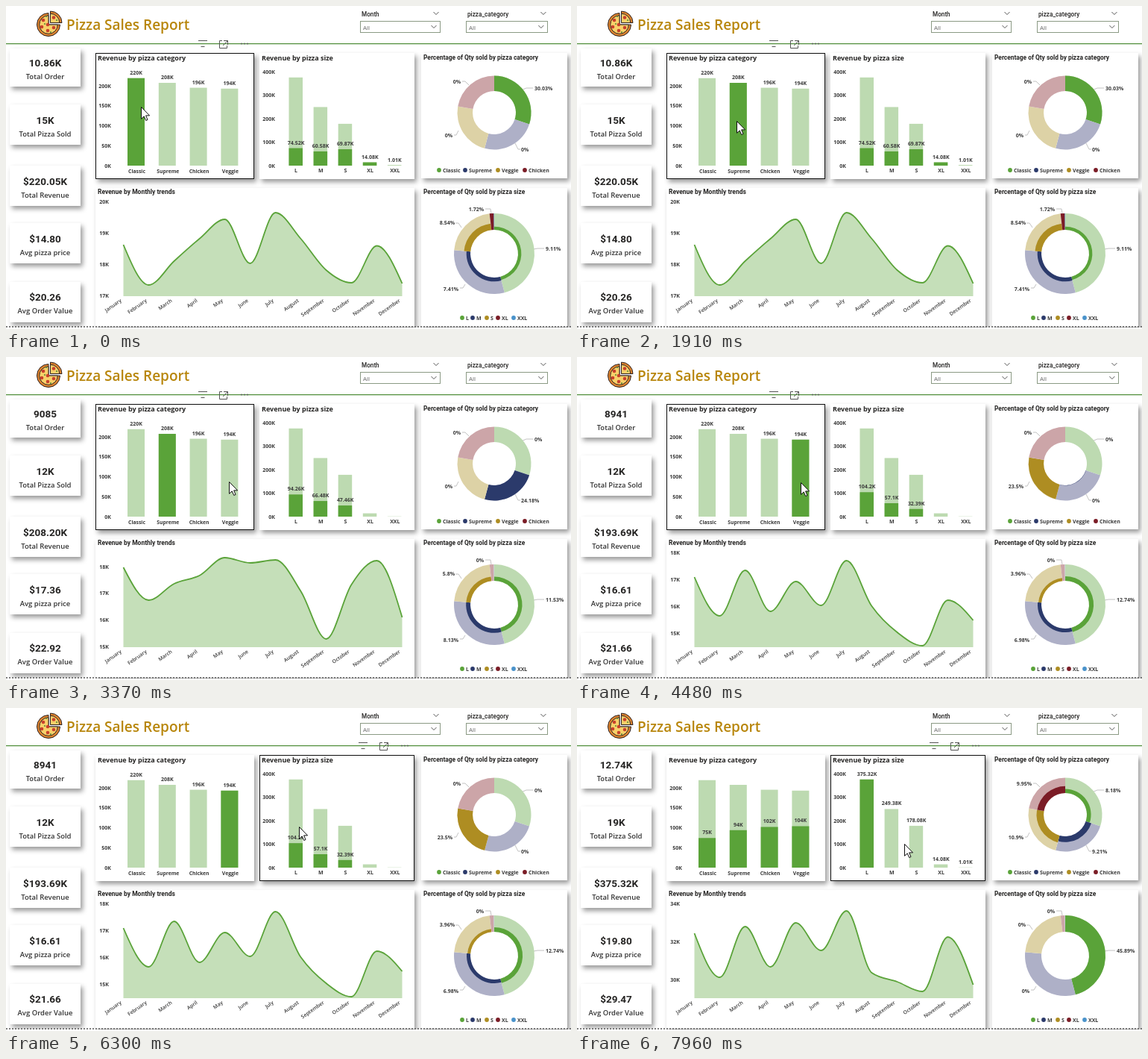
Write an HTML page that moves like this. It is 758 by 433 pixels and loops after 8 s.

```html
<!DOCTYPE html>
<html lang="en">
<head>
<meta charset="utf-8">
<title>Pizza Sales Report</title>
<style>
  html, body { margin: 0; width: 100%; height: 100%; overflow: hidden; background: #fff; }
  svg { display: block; font-family: "Open Sans", "Noto Sans", sans-serif; }
  .din { font-family: Roboto, sans-serif; }
  .card { fill: #fff; filter: drop-shadow(3px 4px 3px #0006); }
  .lead { fill: none; stroke: #b3b3b3; stroke-width: .8; }
  .icon { fill: none; stroke: #555; }
</style>
</head>
<body>
<svg width="758" height="433" viewBox="0 0 758 433">
  <g id="fixed"></g>
  <g id="live"></g>
</svg>
<script>
const LOOP = 8000;
const GREEN = '#5aa339', PALE = '#bddab1';
const COLORS = [GREEN, '#2b3a6b', '#ae8d22', '#7b1c26', '#4a93cb'];
const TINTS = [PALE, '#aeb0c7', '#ddd2a6', '#cca5a8', '#b7d4ea'];
const CATEGORIES = ['Classic', 'Supreme', 'Chicken', 'Veggie'];
const SIZES = ['L', 'M', 'S', 'XL', 'XXL'];
const MONTHS = ['January', 'February', 'March', 'April', 'May', 'June', 'July',
  'August', 'September', 'October', 'November', 'December'];
const CAT_TOTAL = [220.05, 208.2, 195.92, 193.69];
const SIZE_TOTAL = [375.32, 249.38, 178.08, 14.08, 1.01];
const QTY_SHARE = [30.03, 24.18, 23.5, 22.29];
const REVENUE = 817.86;
const KPI_LABELS = ['Total Order', 'Total Pizza Sold', 'Total Revenue', 'Avg pizza price', 'Avg Order Value'];
const KPI_Y = [76, 153, 235, 312, 390];

// axis: top value, value step, top y, y step, tick count
const VIEWS = [
  { at: 0, click: 0, kpi: ['10.86K', '15K', '$220.05K', '$14.80', '$20.26'],
    cat: [220.05, 0, 0, 0], size: [74.52, 60.58, 69.87, 14.08, 1.01], qty: [30.03, 0, 0, 0],
    axis: [20, 1, 262, 42, 4], line: [320, 374, 342, 312, 286, 345, 277, 312, 354, 371, 321.5, 372] },
  { at: 2220, click: 1910, kpi: ['9085', '12K', '$208.20K', '$17.36', '$22.92'],
    cat: [0, 208.2, 0, 0], size: [94.26, 66.48, 47.46, 0, 0], qty: [0, 24.18, 0, 0],
    axis: [18, 1, 281, 35.8, 4], line: [282, 326, 304, 293, 269, 276, 272, 314, 378, 305, 273, 349] },
  { at: 4330, click: 3990, kpi: ['8941', '12K', '$193.69K', '$16.61', '$21.66'],
    cat: [0, 0, 0, 193.69], size: [104.2, 57.1, 32.39, 0, 0], qty: [0, 0, 23.5, 0],
    axis: [18, 1, 262, 36, 4], line: [295, 347, 286, 341, 301, 333, 273, 334, 369, 387, 326, 353] },
  { at: 7160, click: 6770, kpi: ['12.74K', '19K', '$375.32K', '$19.80', '$29.47'],
    cat: [74.52, 94.26, 102.34, 104.2], size: [375.32, 0, 0, 0, 0], qty: [8.18, 9.21, 10.9, 9.95],
    axis: [34, 2, 262, 51, 3], line: [302, 361, 293, 347, 288, 325, 272, 355, 367, 380, 307, 371] },
];

const easeOut = u => 1 - (1 - u) ** 3;
const easeInOut = u => u * u * (3 - 2 * u);
const unit = u => Math.min(1, Math.max(0, u));
const mix = (a, b, p) => a.map((v, i) => v + (b[i] - v) * p);

// start, end, x, y, easing
const MOVES = [
  [810, 1470, 214, 154, easeOut],
  [2530, 3220, 289, 156, easeInOut],
  [3220, 3490, 300, 168, easeOut],
  [5270, 5960, 393, 159, easeInOut],
  [7680, 7950, 439, 182, easeInOut],
];

function cursorAt(t) {
  let pos = [181, 135];
  for (const [start, end, x, y, ease] of MOVES)
    pos = mix(pos, [x, y], ease(unit((t - start) / (end - start))));
  return pos;
}

const text = (x, y, str, size = 7, anchor = 'start', attrs = 'font-weight="700" fill="#3a3a3a"') =>
  `<text x="${x}" y="${y + size * .36}" font-size="${size}" text-anchor="${anchor}" ${attrs}>${str}</text>`;
const rect = (x, y, w, h, attrs) =>
  `<rect x="${x}" y="${y}" width="${w}" height="${Math.max(0, h)}" ${attrs}/>`;
const path = (d, attrs) => `<path d="${d}" ${attrs}/>`;
const dot = (x, y, r, fill) => `<circle cx="${x}" cy="${y}" r="${r}" fill="${fill}"/>`;

function sector(cx, cy, r0, r1, from, to, fill) {
  if (r1 - r0 < .05) return '';
  const point = (r, turn) => {
    const a = turn * 2 * Math.PI;
    return `${(cx + r * Math.sin(a)).toFixed(2)} ${(cy - r * Math.cos(a)).toFixed(2)}`;
  };
  const big = to - from > .5 ? 1 : 0;
  return path(`M${point(r1, from)}A${r1} ${r1} 0 ${big} 1 ${point(r1, to)}L${point(r0, to)}` +
    `A${r0} ${r0} 0 ${big} 0 ${point(r0, from)}Z`, `fill="${fill}"`);
}

function donut(cx, cy, r0, r1, totals, parts) {
  const sum = totals.reduce((a, b) => a + b);
  let turn = 0;
  return totals.map((total, i) => {
    const from = turn;
    turn += total / sum;
    const rim = r0 + (r1 - r0) * parts[i] / total;
    return sector(cx, cy, r0, r1, from, turn, TINTS[i]) + sector(cx, cy, r0, rim, from, turn, COLORS[i]);
  }).join('');
}

const bars = (x, pitch, width, scale, totals, parts) => totals.map((total, i) =>
  rect(x + i * pitch, 214 - total * scale, width, total * scale, `fill="${PALE}"`) +
  rect(x + i * pitch, 214 - parts[i] * scale, width, parts[i] * scale, `fill="${GREEN}"`)).join('');

const barLabels = (x, pitch, scale, values, format) => values.map((v, i) =>
  v ? text(x + i * pitch, 206.5 - v * scale, format(v) + 'K', 7, 'middle') : '').join('');

// Monotone cubic through the twelve monthly points
function trend(ys) {
  const x = i => 157.5 + i * 34;
  const slope = ys.slice(1).map((y, i) => y - ys[i]);
  const tangent = ys.map((_, i) => {
    const a = slope[i - 1], b = slope[i];
    return (Math.sign(a) + Math.sign(b)) * Math.min(Math.abs(a), Math.abs(b), Math.abs(a + b) / 4);
  });
  tangent[0] = (3 * slope[0] - tangent[1]) / 2;
  tangent[11] = (3 * slope[10] - tangent[10]) / 2;
  let d = `M${x(0)} ${ys[0]}`;
  for (let i = 1; i < 12; i++)
    d += `C${x(i - 2 / 3)} ${ys[i - 1] + tangent[i - 1] / 3} ${x(i - 1 / 3)} ${ys[i] - tangent[i] / 3} ${x(i)} ${ys[i]}`;
  return path(d + `V389H${x(0)}Z`, 'fill="#c5dfb9"') +
    path(d, `fill="none" stroke="${GREEN}" stroke-width="1.8"`);
}

const percent = v => +v.toFixed(2) + '%';
const QTY_SPOTS = [[709, 110, 'start'], [691, 192, 'start'], [599, 173, 'end'], [610, 101, 'end']];
const SIZE_SPOTS = [[724, 325, 'start'], [607, 379, 'end'], [602, 290.5, 'end'], [641, 272, 'end']];
const donutLabels = (spots, values) => spots.map(([x, y, anchor], i) =>
  text(x, y, percent(values[i]), 7, anchor)).join('');

const legend = (names, xs, y) => names.map((name, i) =>
  dot(xs[i], y, 2.9, COLORS[i]) + text(xs[i] + 5, y, name)).join('');

const chevron = (x, y) => path(`M${x - 3.5} ${y - 2}l3.5 3.5l3.5 -3.5`, 'class="icon"');
const slicer = (x, width, name) =>
  text(x + 2, 11, name, 8.2, 'start', 'class="din" font-weight="500" fill="#252423"') +
  rect(x + .5, 20.5, width, 15, 'fill="#fff" stroke="#8b9a84"') +
  text(x + 4, 29, 'All', 8, 'start', 'fill="#666"') +
  chevron(x + 102 * width / 107, 10) + chevron(x + 99 * width / 107, 28);

function pizza() {
  const slice = (cx, cy, from, to) =>
    `<g stroke="#2a2020" stroke-width="1">` + sector(cx, cy, .1, 15.5, from, to, '#e0852f') +
    sector(cx, cy, .1, 12.3, from, to, '#f8d06a') + '</g>';
  const toppings = [[50, 19], [48, 28], [56, 33], [64, 29], [56, 25], [64, 15.5]];
  return slice(57, 25, .25, 1) + slice(59.5, 22.5, 0, .25) +
    toppings.map(([x, y]) => dot(x, y, 2.3, '#c8402c')).join('') +
    [[54, 14], [52, 24], [60, 35], [68, 19]].map(([x, y]) => dot(x, y, 1, '#4f8b35')).join('');
}

function drawFixed() {
  const title = 'font-weight="700" fill="#252423"', din = `class="din" ${title}`;
  const cards = [[120, 63, 213, 169], [340, 63, 208, 169], [557, 63, 196, 168],
    [120, 244, 428, 186], [557, 244, 196, 186],
    ...[57, 132, 214, 291, 370].map((y, i) => [5, y, 95, i ? 54 : 51])];
  const leads = ['M691 113L698 110H707', 'M683 184L687 192H690', 'M607 167L604 173H601',
    'M621 106L616 101H612', 'M708 326L713 325H722', 'M616 373L613 378H609',
    'M611 297L607 291H603', 'M651 278L650 272H643'];
  return pizza() +
    text(81, 25, 'Pizza Sales Report', 19, 'start', 'font-weight="600" fill="#b8860b"') +
    slicer(475, 107, 'Month') + slicer(617, 109, 'pizza_category') +
    cards.map(c => rect(...c, 'class="card"')).join('') +
    rect(0, 50, 758, 1.2, 'fill="#4a8a34"') +
    text(123, 70, 'Revenue by pizza category', 9, 'start', title) +
    text(343, 70, 'Revenue by pizza size', 9, 'start', title) +
    text(560, 69, 'Percentage of Qty sold by pizza category', 8.4, 'start', din) +
    text(123, 249, 'Revenue by Monthly trends', 8.5, 'start', din) +
    text(560, 249, 'Percentage of Qty sold by pizza size', 8.4, 'start', din) +
    [0, 50, 100, 150, 200].map(v => text(141, 214 - v * .535, v + 'K', 7, 'end')).join('') +
    [0, 100, 200, 300, 400].map(v => text(361, 214 - v * .315, v + 'K', 7, 'end')).join('') +
    CATEGORIES.map((name, i) => text(175.5 + i * 41.8, 222, name, 6.8, 'middle')).join('') +
    SIZES.map((name, i) => text(389 + i * 33.2, 220, name, 7, 'middle')).join('') +
    MONTHS.map((name, i) => `<g transform="translate(${154 + i * 34} 394) rotate(-35)">` +
      text(0, 0, name, 6.8, 'end', 'font-weight="600" fill="#3a3a3a"') + '</g>').join('') +
    leads.map(d => path(d, 'class="lead"')).join('') +
    legend(['Classic', 'Supreme', 'Veggie', 'Chicken'], [581, 616, 660, 696], 220) +
    legend(SIZES, [612, 626, 645, 660, 681], 418) +
    KPI_LABELS.map((name, i) =>
      text(52.5, KPI_Y[i] + 18.3, name, 9.5, 'middle', 'font-weight="600" fill="#333"')).join('') +
    rect(0, 431, 758, 2, 'fill="#fff"') +
    path('M0 430H758', 'stroke="#555" stroke-width="1.6" stroke-dasharray="2 2"');
}

// Selection frame and toolbar of the chart under the pointer
function hoverFrame(second) {
  const x = second ? 479 : 264;
  return rect(second ? 340.5 : 120.5, 63.5, second ? 207 : 212, 168, 'fill="none" stroke="#111"') +
    path(`M${x - 6} 46.5h12M${x - 2.5} 54.5h5`, 'class="icon"') +
    path(`M${x + 26} 46.5h-3.5v10h10v-3.5M${x + 28} 46.5h5.5v5.5M${x + 33.5} 46.5l-6.5 6.5`, 'class="icon"') +
    [52, 56, 60].map(dx => dot(x + dx, 50.5, .9, '#555')).join('');
}

function drawLive(t) {
  const index = VIEWS.findLastIndex(v => t >= v.at);
  const view = VIEWS[index], before = VIEWS[index - 1] || view;
  const clicked = VIEWS.findLast(v => t >= v.click);
  const p = easeOut(unit((t - view.at + 50) / 270));
  const bySize = index === 3;
  const waiting = clicked !== view;

  const size = mix(before.size, view.size, p);
  let cat = clicked.cat;
  if (clicked === VIEWS[3]) cat = waiting ? CAT_TOTAL : mix(CAT_TOTAL, view.cat, p);
  const sizeBars = clicked === VIEWS[3] ? clicked.size : size;

  const [top, step, y0, dy, count] = view.axis;
  const ticks = Array.from({ length: count }, (_, i) => text(138, y0 + i * dy, top - i * step + 'K', 7, 'end'));
  const [cx, cy] = cursorAt(t);

  return view.kpi.map((v, i) =>
      text(52.5, KPI_Y[i], v, 13.5, 'middle', 'class="din" font-weight="700" fill="#252423"')).join('') +
    bars(163, 41.8, 23, .533, CAT_TOTAL, cat) +
    barLabels(174.5, 41.8, .533, bySize ? view.cat : CAT_TOTAL, Math.round) +
    bars(379.5, 33.1, 18.5, .315, SIZE_TOTAL, sizeBars) +
    barLabels(389, 33.1, .315, bySize ? SIZE_TOTAL : view.size, v => v) +
    ticks.join('') + trend(view.line) +
    donut(655, 143, 29, 49.5, QTY_SHARE, mix(before.qty, view.qty, p)) +
    donut(655, 332, 32, 54, SIZE_TOTAL, size) +
    donutLabels(QTY_SPOTS, view.qty) +
    donutLabels(SIZE_SPOTS, view.size.map(v => v / REVENUE * 100)) +
    hoverFrame(cx > 336) +
    path('M.5 .5V16.3L4.2 12.9L6.7 18.5L9 17.5L6.6 11.9H11.6Z',
      `transform="translate(${cx} ${cy})" fill="#fff" stroke="#111"`);
}

const live = document.getElementById('live');
document.getElementById('fixed').innerHTML = drawFixed();

function frame() {
  live.innerHTML = drawLive(performance.now() % LOOP);
  requestAnimationFrame(frame);
}
frame();
</script>
</body>
</html>
```
